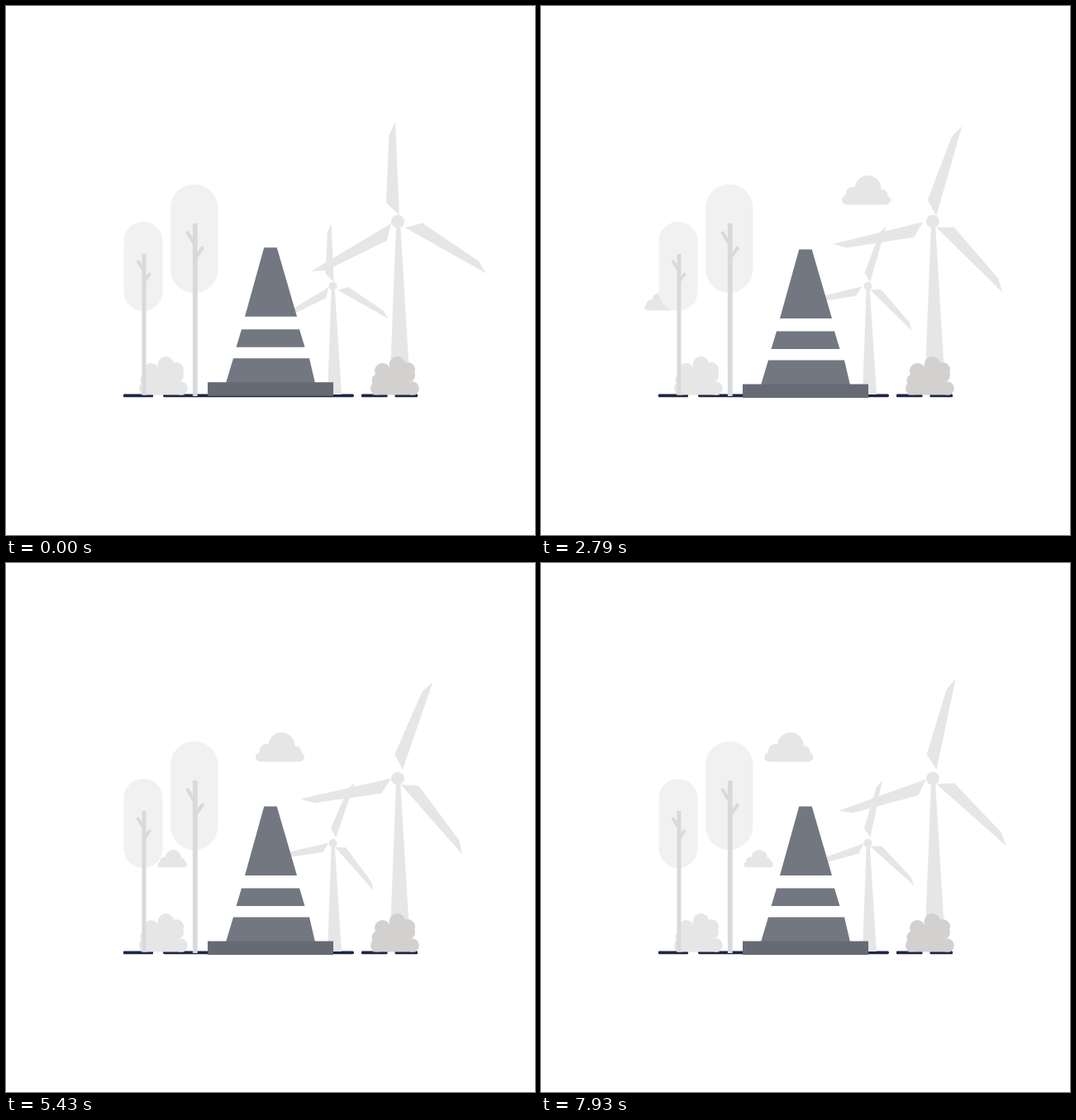
Write an HTML page that moves like this. It is 640 px wide and 640 px high and loops after 8 s.

```html
<!DOCTYPE html>
<html lang="en">
<head>
<meta charset="utf-8">
<title>Traffic cone and wind turbines</title>
<style>
  html, body { margin: 0; width: 100%; height: 100%; overflow: hidden; background: #fff; }
  svg { display: block; width: 100%; height: 100%; }
</style>
</head>
<body>
<svg viewBox="0 0 640 640">
  <defs>
    <path id="blade" d="M0-120.5L-8.1-105L-13.5-23L2-8Z"/>
    <g id="rotor">
      <circle r="8"/>
      <use href="#blade" y="-3.5"/>
      <use href="#blade" transform="rotate(119.7)"/>
      <use href="#blade" transform="rotate(238.2)"/>
    </g>
    <g id="cloudShape">
      <circle cx="31.5" cy="16" r="16"/>
      <circle cx="13" cy="22.5" r="8.5"/>
      <circle cx="48" cy="24" r="7.5"/>
      <rect y="24" width="59" height="11.5" rx="5.75"/>
      <rect x="10" y="18" width="38" height="15"/>
    </g>
    <g id="bush">
      <path d="M164 470.5L170 444L194 434L207 444L207 456L216 470.5Z"/>
      <circle cx="193.5" cy="434" r="10"/>
      <circle cx="175.5" cy="441.5" r="9.5"/>
      <circle cx="171" cy="453" r="8.5"/>
      <circle cx="169" cy="462.5" r="8"/>
      <circle cx="206" cy="440" r="9"/>
      <circle cx="207" cy="447" r="8"/>
      <circle cx="211.5" cy="462.5" r="8.3"/>
    </g>
  </defs>

  <g fill="#1f2544">
    <rect x="142" y="469.5" width="36" height="3.7" rx="1"/>
    <rect x="190" y="469.5" width="231" height="3.7" rx="1.8"/>
    <rect x="430" y="469.5" width="31.5" height="3.7" rx="1"/>
    <rect x="470.5" y="469.5" width="27.5" height="3.7" rx="1"/>
  </g>

  <g fill="#e6e6e6">
    <path d="M472 264H477L489.5 470H464Z"/>
    <path d="M393.7 342H397.7L406 470H389Z"/>
    <use id="bigRotor" href="#rotor"/>
    <use id="smallRotor" href="#rotor"/>
    <use id="bigCloud" href="#cloudShape"/>
    <use id="smallCloud" href="#cloudShape"/>
  </g>

  <g fill="#f1f1f1">
    <rect x="142.5" y="261" width="47" height="108" rx="23.5"/>
    <rect x="199" y="215.7" width="57.3" height="131.5" rx="28.6"/>
  </g>
  <use href="#bush" fill="#e6e6e6"/>
  <g fill="none" stroke="#d9d9d9">
    <path d="M167 300V470.5" stroke-width="5"/>
    <path d="M159 308L167 321M174.5 323L167 334" stroke-width="3.5"/>
    <path d="M228.8 263V472" stroke-width="5.8"/>
    <path d="M219 273L228.5 289M238.5 291.5L229 305" stroke-width="4.2"/>
  </g>
  <use href="#bush" x="280" fill="#d2d1cf"/>

  <g id="cone">
    <path fill="#fff" d="M312 294.5H327.7L374 458.5H266Z"/>
    <path fill="#737781" d="M312.2 294.5H327.7L352 378H289ZM285 393.5H355L361.5 415H278.5ZM275 428.5H367L374 458.5H266Z"/>
    <rect fill="#666a75" x="244" y="457.5" width="152" height="16.6"/>
  </g>
</svg>
<script>
const LOOP = 8;
const get = id => document.getElementById(id);
const clamp = v => Math.min(1, Math.max(0, v));
const smooth = v => { v = clamp(v); return v * v * (3 - 2 * v); };

// Ease with control points (x1, 0) and (x2, 1), solved by bisection.
function ease(x, x1, x2) {
  let low = 0, high = 1;
  for (let i = 0; i < 30; i++) {
    const s = (low + high) / 2, r = 1 - s;
    if (3 * r * r * s * x1 + 3 * r * s * s * x2 + s * s * s < x) low = s; else high = s;
  }
  return smooth(low);
}

// Smooth curve through [time, value] points.
function curve(points, t) {
  let i = 0;
  while (i < points.length - 2 && t > points[i + 1][0]) i++;
  const slope = k => {
    const a = points[Math.max(0, k - 1)], b = points[Math.min(points.length - 1, k + 1)];
    return (b[1] - a[1]) / (b[0] - a[0]);
  };
  const [t0, v0] = points[i], [t1, v1] = points[i + 1];
  const d = t1 - t0, u = (t - t0) / d, w = 1 - u;
  return v0 * w * w * (1 + 2 * u) + v1 * u * u * (3 - 2 * u)
    + d * u * w * (slope(i) * w - slope(i + 1) * u);
}

const bigPath = [[1, 387], [1.64, 381], [2.79, 364], [4.43, 324], [5.43, 302], [6.93, 279.7], [8, 269.7]];
const smallPath = [[1, 105.5], [1.64, 107], [2.79, 125], [4.43, 159.5], [5.43, 183.5], [6.93, 221.7], [8, 247]];

function place(id, x, y, rest = '') {
  get(id).setAttribute('transform', `translate(${x} ${y}) ${rest}`);
}

function draw(t) {
  const angle = 120.4 + 1440 * ease(clamp((t - 0.012) / 11.87), 0.573, 0.143);
  place('bigRotor', 474, 260.7, `rotate(${angle})`);
  place('smallRotor', 395.5, 338.8, `rotate(${angle}) scale(.627)`);

  const shown = clamp((t - 0.93) / 0.5);
  place('bigCloud', curve(bigPath, Math.max(1, t)), 205);
  place('smallCloud', curve(smallPath, Math.max(1, t)), 347, 'scale(.6)');
  get('bigCloud').style.opacity = get('smallCloud').style.opacity = shown;

  place('cone', 0, 2.3 * (smooth(t / 1.65) - 1));
}

function tick() {
  draw(performance.now() / 1000 % LOOP);
  requestAnimationFrame(tick);
}
tick();
</script>
</body>
</html>
```
